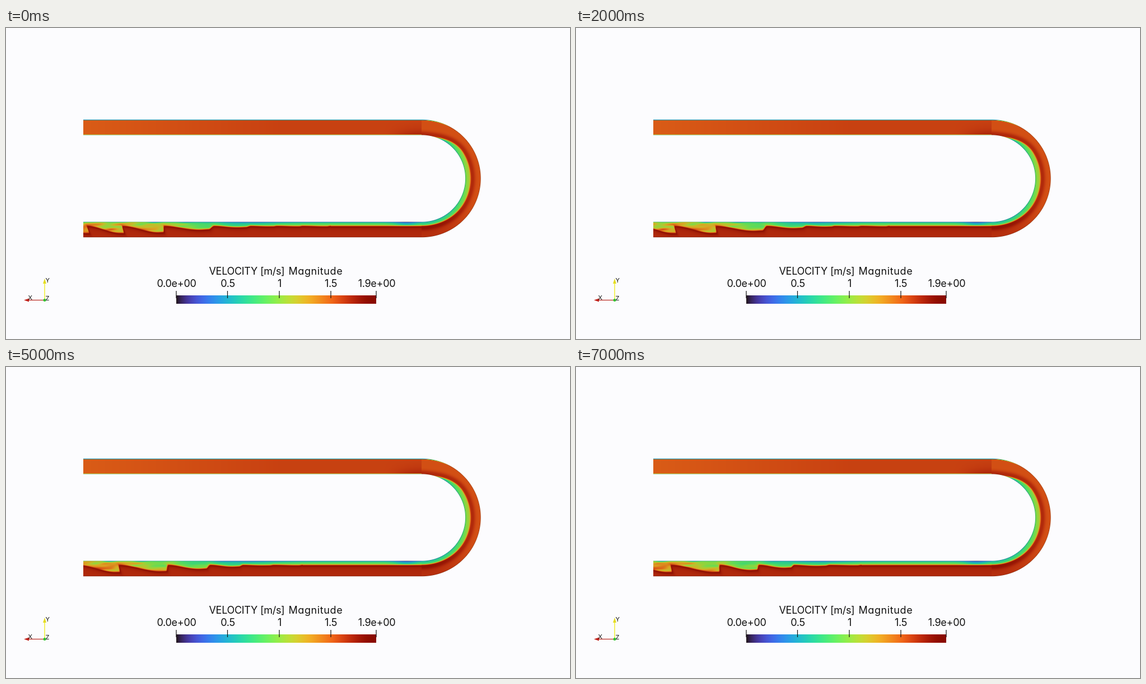
Recreate the animation shown at these times as an HTML page with a canvas. Size 1007 by 556 pixels, loop 8000 ms.

```html
<!DOCTYPE html>
<html lang="en">
<head>
<meta charset="utf-8">
<title>Pipe bend velocity</title>
<style>
  html, body { margin: 0; width: 100%; height: 100%; overflow: hidden; background: #fcfcfe; }
  canvas, svg { position: absolute; left: 0; top: 0; width: 1007px; height: 556px; }
  text { font-family: Inter, Lato, sans-serif; font-feature-settings: "cv11", "ss03"; fill: #111; }
  .label { font-size: 18px; letter-spacing: -.3px; }
  .wide { letter-spacing: .6px; }
  .axis { font-size: 11px; }
</style>
</head>
<body>
<canvas id="pipe" width="1007" height="556"></canvas>
<svg viewBox="0 0 1007 556">
  <defs><linearGradient id="scale"></linearGradient></defs>
  <rect x="304" y="478" width="357" height="15" fill="url(#scale)"/>
  <path d="M304 470V483M395.5 470V483M488 470V483M580 470V483M661 470V483" stroke="#111" stroke-width="1.2"/>
  <g class="label">
    <text x="362.5" y="441">VELOCITY</text>
    <text x="454" y="441">[m/s]</text>
    <text class="wide" x="504.5" y="441">Magnitude</text>
    <g text-anchor="middle">
      <text x="304.5" y="463">0.0e+00</text>
      <text x="396" y="463">0.5</text>
      <text x="488.5" y="463">1</text>
      <text x="580" y="463">1.5</text>
      <text x="662" y="463">1.9e+00</text>
    </g>
  </g>
  <path d="M69 486.5H40" stroke="#b8251c" stroke-width="1.2"/>
  <path d="M32 486.5L41 483.5V489.5Z" fill="#c0201a"/>
  <path d="M69 487V456" stroke="#f2ee3c" stroke-width="1.6"/>
  <path d="M69 448L66 457H72Z" fill="#e4dc22"/>
  <circle cx="69" cy="486.5" r="2.5" fill="#2fc22f"/>
  <g class="axis">
    <text x="39.5" y="486">X</text>
    <text x="70.5" y="455">Y</text>
    <text x="70.5" y="487">Z</text>
  </g>
</svg>
<script>
const LEFT = 138, CX = 742.5, CY = 269, R_IN = 77.6, WIDTH = 27.6;
const STEP = 1000, STEPS = 8;
const ctx = document.getElementById('pipe').getContext('2d');

const clamp = (v, a = 0, b = 1) => Math.min(b, Math.max(a, v));
const mix = (a, b, k) => a + (b - a) * k;
const smooth = k => { k = clamp(k); return k * k * (3 - 2 * k); };
const bump = (x, mid, size) => Math.exp(-(((x - mid) / size) ** 2));

// Rainbow colour map: one polynomial per channel
const CHANNELS = [
  v => .136 + v * (4.615 + v * (-42.66 + v * (132.131 + v * (-152.942 + v * 59.286)))),
  v => .091 + v * (2.194 + v * (4.843 + v * (-14.185 + v * (4.277 + v * 2.83)))),
  v => .107 + v * (12.642 + v * (-60.582 + v * (110.363 + v * (-89.903 + v * 27.348))))
];
const rainbow = (v, shade) => CHANNELS.map(f => Math.round(255 * shade * clamp(f(clamp(v)))));

function hash(i, j) {
  const s = Math.sin(i * 127.1 + j * 311.7) * 43758.5453;
  return s - Math.floor(s);
}

function noise(x, y) {
  const i = Math.floor(x), j = Math.floor(y), u = smooth(x - i), v = smooth(y - j);
  return mix(mix(hash(i, j), hash(i + 1, j), u), mix(hash(i, j + 1), hash(i + 1, j + 1), u), v);
}

// Each breaking wave deepens to the right and ends in a steep rise
const CRESTS = [95, 150, 213, 287, 374, 438, 484, 530, 580];

function wave(x) {
  const i = CRESTS.findIndex(c => c > x);
  if (i < 1) return .5;
  const k = (x - CRESTS[i - 1]) / (CRESTS[i] - CRESTS[i - 1]);
  return smooth(k / .75) * smooth((1 - k) / .14);
}

// Distance the flow carries a wave in one step
const speed = x => 16 - 6 * smooth((x - 280) / 230);

function outlet(x, m, step) {
  const drift = step * speed(x);
  const grow = 12 * smooth((480 - x) / 260) + .8;
  const lean = .06 * grow * (13 - m);
  const edge = 6.5 + wave(x + drift + lean) * grow;
  const swirl = noise((x + drift + m * 1.6) / 19, m / 4.5 + 3) - .5;
  const base = mix(.57, .38, smooth((x - 139) / 280))
    - .08 * bump(x, 430, 60) - .15 * bump(x, 715, 22);
  const low = base + .32 * smooth((500 - x) / 340) * swirl
    + .12 * clamp(m / edge) - .2 * Math.exp(-m / 1.3);
  const under = m - edge;
  const core = .87 + .07 * Math.exp(-Math.abs(under - 2) / 3);
  return mix(low, core, smooth((under + 2) / 4));
}

// The slow layer leaves the inner wall early in the bend, then thins out
function bend(angle, m) {
  const edge = 11 * smooth((angle - .1) / .9) - 2 - 2.5 * smooth((angle - 2.1) / 1);
  const low = .34 + .15 * bump(angle, 1.5, .7) + .08 * clamp(m / 8) - .1 * Math.exp(-m / 1.2);
  const core = mix(.8, .86, smooth((angle - 1.8) / 1.3)) + .07 * bump(m, edge + 4, 5);
  return mix(low, core, smooth((m - edge + 1.8) / 3.6));
}

function inlet(x, m) {
  const fast = .07 * smooth((x - 670) / 72) * Math.exp(-m / 8);
  const core = mix(.78, .825, clamp((x - LEFT) / 350)) + fast;
  return mix(core, .42, smooth(1.3 - m));
}

// Skin of slow fluid on the outer wall
const skin = (v, m, strength) => mix(v, .06, strength * smooth((m - WIDTH + 1.6) / 1.3));

// Distance from the inner wall and local velocity
function sample(x, y, step) {
  const straight = x < CX;
  const m = (straight ? Math.abs(y - CY) : Math.hypot(x - CX, y - CY)) - R_IN;
  if (m < -1 || m > WIDTH + 1) return null;
  if (!straight) {
    const angle = Math.atan2(x - CX, CY - y);
    return [m, skin(bend(angle, m), m, .9 * clamp(1 - angle / .5))];
  }
  return [m, y < CY ? skin(inlet(x, m), m, .9) : outlet(x, m, step)];
}

function paint(step) {
  const x0 = LEFT, y0 = 162, w = 712, h = 214;
  const img = ctx.createImageData(w, h);
  for (let j = 0; j < h; j++) {
    for (let i = 0; i < w; i++) {
      const hit = sample(x0 + i + .5, y0 + j + .5, step);
      if (!hit) continue;
      const [m, v] = hit;
      const wall = Math.min(m, WIDTH - m);
      const shade = .86 - .22 * smooth(1.2 - wall);
      img.data.set([...rainbow(v, shade), 255 * clamp(wall + .5)], 4 * (j * w + i));
    }
  }
  ctx.putImageData(img, x0, y0);
}

function fillScale() {
  const n = 40;
  let stops = '';
  for (let i = 0; i <= n; i++) {
    stops += `<stop offset="${i / n}" stop-color="rgb(${rainbow(i / n, .95)})"/>`;
  }
  document.getElementById('scale').innerHTML = stops;
}

let shown = -1;
function frame() {
  const step = Math.floor(performance.now() / STEP) % STEPS;
  if (step !== shown) paint(shown = step);
  requestAnimationFrame(frame);
}

fillScale();
frame();
</script>
</body>
</html>
```
